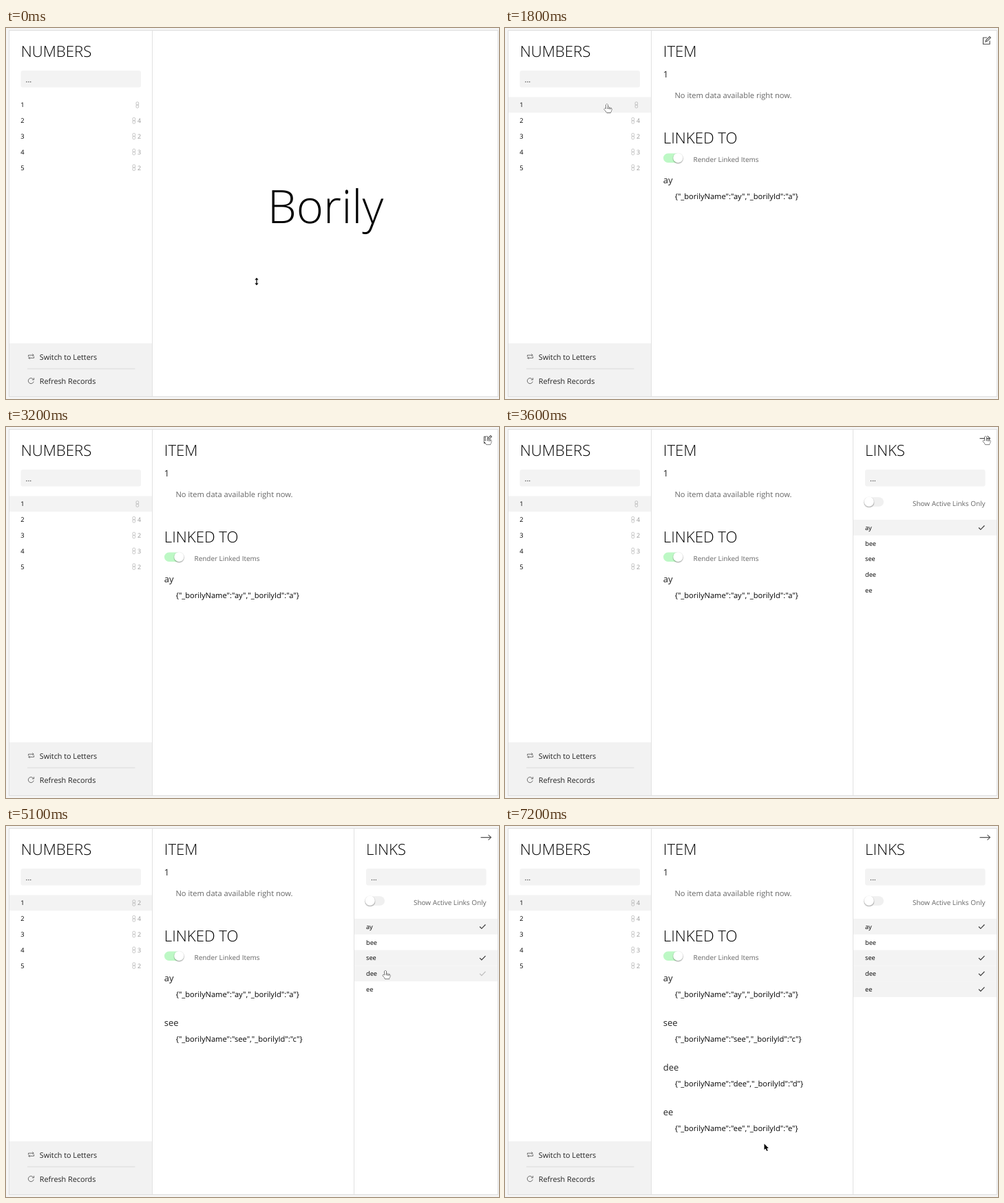
These frames come from a looping animation (716x540 px, 7300 ms). An HTML page:

```html
<!DOCTYPE html>
<html lang="en">
<head>
<meta charset="utf-8">
<title>Linked records</title>
<style>
  html, body { margin: 0; width: 100%; height: 100%; overflow: hidden; background: #f5f5f5; }
  svg { display: block; width: 716px; height: 540px; font-family: "Open Sans", sans-serif; text-rendering: geometricPrecision; }
</style>
</head>
<body>
<svg id="stage" viewBox="0 0 716 540"></svg>
<script>
const LOOP = 7300, STEP = 100, ROW = 22.8;
const OPEN_ITEM = 1800, OPEN_LINKS = 3400;
const BRAND = 'Borily';
const stage = document.getElementById('stage');

// Link names with their ids and the time each one becomes active
const links = [['ay', 'a', 0], ['bee', 'b', Infinity], ['see', 'c', 4700], ['dee', 'd', 5200], ['ee', 'e', 5600]];
const counts = ['', 4, 2, 3, 2];

// Pointer hot spot: time, x, y
const path = [
  [0, 364, 369], [800, 364, 369], [1500, 148, 110.5], [1800, 148, 110.5], [3100, 698, 13],
  [3650, 698, 13], [4400, 554, 192], [4900, 554, 192], [5100, 551, 210], [5400, 551, 210],
  [5550, 546, 232], [6500, 546, 232], [7200, 376.5, 462.5], [LOOP, 376.5, 462.5]
];

function pointerAt(t) {
  const i = path.findIndex(k => k[0] > t);
  const [t0, x0, y0] = path[i - 1], [t1, x1, y1] = path[i];
  const p = (t - t0) / (t1 - t0), e = p * p * (3 - 2 * p);
  return { x: x0 + (x1 - x0) * e, y: y0 + (y1 - y0) * e };
}

const rect = (x, y, w, h, fill, extra = '') =>
  `<rect x="${x}" y="${y}" width="${w}" height="${h}" fill="${fill}" ${extra}/>`;
const text = (s, x, y, size, fill = '#000', extra = '') =>
  `<text x="${x}" y="${y}" font-size="${size}" fill="${fill}" ${extra}>${s}</text>`;
const line = (d, color, width = 1) =>
  `<path d="${d}" fill="none" stroke="${color}" stroke-width="${width}"/>`;
const at = (x, y, content) => `<g transform="translate(${x} ${y})">${content}</g>`;
const title = (s, x, y = 42) => text(s, x, y, 22.2, '#000', 'font-weight="330"');
const search = x => rect(x, 62, 174.5, 24.5, '#f3f3f3', 'rx="3"') + text('...', x + 7, 79, 11, '#333');
const check = (y, color) => line(`M688 ${y}l2.8 2.8 5.6-5.8`, color, 1.15);

function toggle(x, y, on) {
  const knob = x + (on ? 21.3 : 6.7);
  return rect(x, y - 6.5, 28, 13.5, on ? '#bdf8c5' : '#f0f0f0', 'rx="6.7"') +
    `<circle cx="${knob}" cy="${y + .8}" r="8" fill="#000" opacity=".1"/>` +
    `<circle cx="${knob}" cy="${y + 1}" r="7.4" fill="#000" opacity=".16"/>` +
    `<circle cx="${knob}" cy="${y}" r="7.1" fill="#fff"/>`;
}

const chain = (x, y) => at(x, y,
  `<g fill="none" stroke="#b8b8b8" stroke-width=".8"><rect x="-1.8" y="-4.3" width="3.6" height="4.5" rx="1.4"/>` +
  `<rect x="-1.8" y="-.2" width="3.6" height="4.5" rx="1.4"/></g>`);

function sidebar(t, hover) {
  const active = links.filter(l => l[2] <= t).length;
  let out = title('NUMBERS', 21.7) + search(21.5);
  counts.forEach((n, i) => {
    const y = 112 + i * ROW, count = i || active < 2 ? n : active;
    if (i === hover || (i === 0 && t >= OPEN_ITEM)) out += rect(5, y - 11.5, 207.5, ROW, '#f3f3f3');
    out += text(i + 1, 21.3, y + 3.4, 9.3) + chain(count ? 185.8 : 190.8, y) +
      text(count, 196.2, y + 3.4, 9, '#999', 'text-anchor="end"');
  });
  return out + rect(5, 459, 207.5, 77, '#f2f2f2') + rect(31, 495.5, 156.5, 1, '#dcdcdc') +
    line('M32.5 478.5v-2.3h7.7m-1.8-1.8 1.8 1.8-1.8 1.8M40.6 478v2.3h-7.7m1.8-1.8-1.8 1.8 1.8 1.8', '#555', .85) +
    line('M39.8 511.6a4 4 0 1 0 .4 3M40.6 509.3v2.7h-2.7', '#555', .85) +
    text('Switch to Letters', 48.8, 482.5, 10.8, '#222') +
    text('Refresh Records', 48.8, 518, 10.8, '#222') +
    rect(212, 4, 1, 532, '#e2e2e2');
}

function itemPanel(t) {
  const active = links.filter(l => l[2] <= t);
  return title('ITEM', 229.8) + text('1', 229.8, 71.8, 13, '#222') +
    text('No item data available right now.', 246.5, 101.8, 11.1, '#666') +
    title('LINKED TO', 229.8, 167.5) + toggle(230, 189, true) +
    text('Render Linked Items', 273.5, 195.3, 9.95, '#666') +
    active.map(([name, id], i) => {
      const data = JSON.stringify({ [`_${BRAND.toLowerCase()}Name`]: name, [`_${BRAND.toLowerCase()}Id`]: id });
      return text(name, 229.8, 226 + i * 65, 13, '#222') + text(data, 246.7, 249.2 + i * 65, 11.1);
    }).join('');
}

function linksPanel(t, hover) {
  return rect(505, 4, 1, 532, '#e2e2e2') + title('LINKS', 523) + search(523) +
    toggle(522, 108.7, false) +
    text('Show Active Links Only', 697.5, 115, 9.95, '#666', 'text-anchor="end"') +
    links.map(([name, , since], i) => {
      const y = 146.5 + i * ROW, on = since <= t, over = i === hover;
      return (on || over ? rect(506, y - 11.5, 208, ROW, '#f3f3f3') : '') +
        text(name, 523, y + 3.3, 9.2) + (on || over ? check(y, on ? '#333' : '#bbb') : '');
    }).join('') +
    line('M689.5 16.6h15m-4-3.8 4 3.8-4 3.8', '#555', 1.1);
}

const editIcon = line('M700 14h-5.5v9.5h9.5v-5M698 20l.7-2.5 5-5 1.6 1.6-5 5z', '#555', 1.2);

const cursors = {
  resize: 'M0-5.6 2.6-2.6H.6V2.6H2.6L0 5.6-2.6 2.6H-.6V-2.6H-2.6Z',
  arrow: 'M0 0V8.8L2 7 3.6 10.6 5.2 9.9 3.7 6.4H6.3Z',
  hand: 'M-1.2 7.5V1.2Q0-.6 1.2 1.2V5Q2.4 4 3.3 5.4 4.6 4.6 5.2 6 6.8 5.6 6.8 7.2V9Q6.5 10.5 5.6 11.5V12.6H-.4Q-.8 10.8-3.8 8-4 6.4-2.6 6.6Z'
};

function cursor(kind, { x, y }) {
  const hand = kind === 'hand';
  return at(x, y, `<path d="${cursors[kind]}" fill="${hand ? '#fff' : '#000'}" stroke="${hand ? '#111' : '#fff'}" ` +
    `stroke-width="1" paint-order="stroke"/>` + (hand ? line('M1.2 5v2.3M3.3 5.6v2M5.2 6.2v1.6', '#111', .8) : ''));
}

function draw(t) {
  const p = pointerAt(t), itemOpen = t >= OPEN_ITEM, linksOpen = t >= OPEN_LINKS;
  const rowAt = top => {
    const i = Math.floor((p.y - top) / ROW);
    return i >= 0 && i < 5 ? i : -1;
  };
  const numberRow = p.x < 212 ? rowAt(100.5) : -1;
  const linkRow = linksOpen && p.x > 506 ? rowAt(135) : -1;
  const overIcon = itemOpen && p.x > 689 && p.y < 27;
  const kind = t < 900 ? 'resize' : numberRow >= 0 || linkRow >= 0 || overIcon ? 'hand' : 'arrow';
  stage.innerHTML =
    rect(4.5, 3.5, 710, 533, '#fff', 'stroke="#dedede"') +
    sidebar(t, numberRow) +
    (itemOpen ? itemPanel(t) : text(BRAND, 464, 284, 67, '#000', 'font-weight="300" text-anchor="middle"')) +
    (linksOpen ? linksPanel(t, linkRow) : itemOpen ? editIcon : '') +
    cursor(kind, p);
}

let shown = -1;
function tick() {
  const t = Math.floor(performance.now() % LOOP / STEP) * STEP;
  if (t !== shown) draw(shown = t);
  requestAnimationFrame(tick);
}
tick();
</script>
</body>
</html>
```
